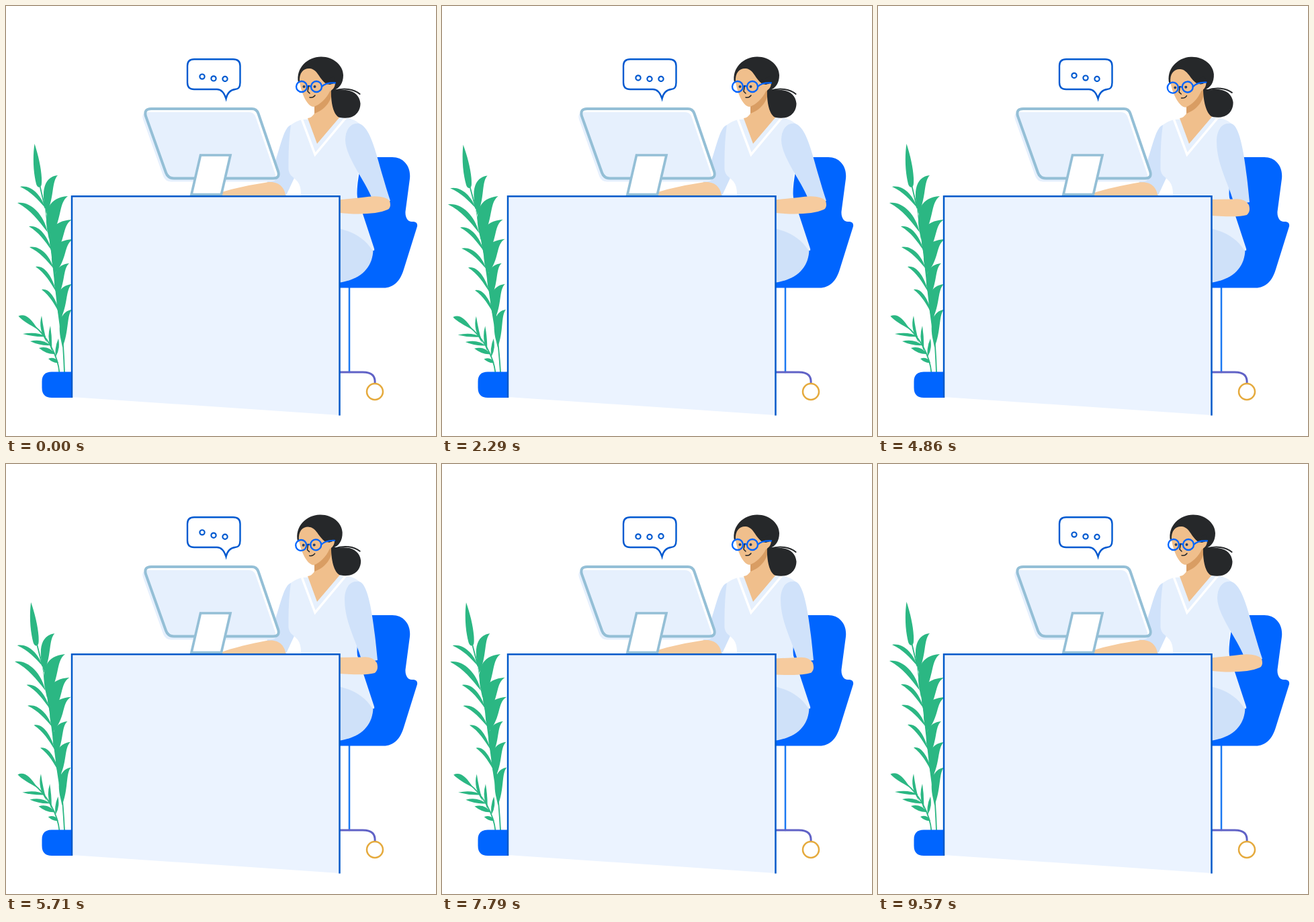
Recreate the animation shown at these times as an HTML page. Size 640 px wide and 640 px high, loop 9640 ms.

```html
<!DOCTYPE html>
<html lang="en">
<head>
<meta charset="utf-8">
<title>Desk</title>
<style>
html, body { margin: 0; width: 100%; height: 100%; overflow: hidden; background: #fff; }
svg { display: block; width: 100vw; height: 100vh; }
.line { fill: none; stroke-linecap: round; stroke-linejoin: round; }
</style>
</head>
<body>
<svg viewBox="0 0 640 640">
  <defs>
    <path id="screen" d="M216 153H366Q373 153 375.500 160L405 246Q408 256.500 398 256.500H250Q241 256.500 238 248L208 164Q205 153 216 153Z"/>
  </defs>

  <!-- plant -->
  <g id="plant" fill="#2bb783">
    <path d="M42.500 205C40 222 40 245 45 265C47 272 53 271 53 264C54 248 49 225 42.500 205Z"/>
    <path class="line" stroke="#2bb783" stroke-width="1.800" d="M50 266L58 300M80 455C84 485 86 515 87 546"/>
    <path d="M57 295L64 335L70 365L74 400L80 430L84 465L85 500L83 500L77 455L72 410L67 365L61 325Z"/>
  </g>
  <g id="sprig" fill="#2bb783">
    <path d="M18.500 461.500C28 457 37 464 47 481C36 475 24 468 18.500 461.500Z"/>
    <path class="line" stroke="#2bb783" stroke-width="1.800" d="M42 476C60 491 77 518 79.500 546"/>
  </g>
  <path d="M98 544.500H68Q53.500 544.500 53.500 559V568Q53.500 583 68 583H98Z" fill="#0065ff"/>

  <!-- chair -->
  <path d="M511 418V545" class="line" stroke="#1b78f2" stroke-width="2.500"/>
  <path d="M490 545H531C545 545 550 551 549 562" class="line" stroke="#6062c6" stroke-width="3"/>
  <circle cx="549" cy="574" r="12" fill="#fff" stroke="#e5aa3d" stroke-width="2.500"/>
  <path d="M534 225H575C592 225 603 239 601 257L594.500 306C594 315 598 321 604 321H607Q613 322 612 328L592 392C587 409 577 419.500 562 419.500H490V330L522 290C522 268 525 240 534 225Z" fill="#0065ff"/>

  <!-- body -->
  <path d="M490 329C520 333 540 348 546.500 362C546 391 526 409 490 412.500Z" fill="#cfe1f9"/>
  <path d="M424 177C414 181 410 203 400 234L388 264L416 284L429 256L434 220Z" fill="#d0e2fa"/>
  <path d="M424 177Q432 171 441 169L505 166Q518 168 526 175L524 250Q521 270 523 285L548 361Q549 366 545 363C532 344 515 335 490 330V284H439C440 262 432 260 424 252Q420 247 420.500 240Q420 205 424 177Z" fill="#e6f0fd"/>
  <path d="M440.500 169L460 221L506 166" fill="none" stroke="#fff" stroke-width="3.500"/>
  <path d="M460 146L459.500 159Q456 166 449 167L463 205L497 165L488 122Z" fill="#f0bf8c"/>
  <path d="M459 146L485 122C487 139 476 154 459 160Z" fill="#d99d63"/>
  <path id="sleeve" fill="#d0e2fa"/>
  <path id="forearm" fill="#f6cb9e"/>

  <!-- head -->
  <g id="tail">
    <path d="M484 123C483 145 488 164 497 166C519 170 527.500 157 527.500 145C526 129 511 123 494 125Z" fill="#26282a"/>
    <path d="M488 126C504 121 518 124 526.500 131" class="line" stroke="#26282a" stroke-width="2"/>
  </g>
  <g id="head">
    <path d="M435 114C431 92 449 75.500 469 75.500C488 75.500 502 89 502 103C502 115 496 123 488 125L470 118Z" fill="#26282a"/>
    <path d="M437 113C436 99 443 92.500 452 93C464 94 466 109 477 116Q484 118 490 114C490 121 486 125 482 127C477 138 467 147 458 150C449 150 440 132 437 113Z" fill="#f0bf8c"/>
    <path d="M472 111L482 117L490 113L488 105Z" fill="#26282a"/>
    <g class="line" stroke="#0065ff" stroke-width="2.300">
      <circle cx="440" cy="120" r="8"/><circle cx="462" cy="120" r="8"/>
      <path d="M448 120Q451 118 454 120M470 120C475 115 483 114 490 114.500"/>
    </g>
    <circle cx="443.500" cy="120" r="2" fill="#26406b"/><circle cx="459.500" cy="120" r="2" fill="#26406b"/>
    <path d="M450.500 119L449 127L452 130M452 136Q457 137 460 133" class="line" stroke="#26282a" stroke-width="1.500"/>
  </g>

  <!-- computer -->
  <path id="hand" d="M318 278C340 271 365 266 388 262.500C405 260 416 269 416.500 287H318Z" fill="#f6cb9e"/>
  <use href="#screen" fill="#fff"/>
  <use href="#screen" fill="#e6f0fd" transform="translate(-4 5)"/>
  <use href="#screen" fill="none" stroke="#94bfd6" stroke-width="4"/>
  <path d="M289.500 222H334L320.500 280.500H276Z" fill="#fff" stroke="#94bfd6" stroke-width="3.700"/>

  <!-- desk -->
  <path d="M98 283.300H496.500V609L98 582Z" fill="#ebf3ff"/>
  <path d="M98 583V283.300H496.500V609.500" fill="none" stroke="#0059c9" stroke-width="2.500"/>

  <!-- bubble -->
  <g fill="#fff" stroke="#0059d0" stroke-width="2.400">
    <path d="M280 79.300H338Q348.500 79.300 348.500 89V114Q348.500 124 341 124C333 125 329 131 327.500 138C325 130 321 124 314 124H280Q270 124 270 114V89Q270 79.300 280 79.300Z"/>
    <g id="dots"></g>
  </g>
</svg>
<script>
const $ = id => document.getElementById(id);
const add = (parent, tag, attrs) => {
  const el = document.createElementNS('http://www.w3.org/2000/svg', tag);
  for (const k in attrs) el.setAttribute(k, attrs[k]);
  return parent.appendChild(el);
};

// leaves: tip x, tip y, joint x, joint y
const leftLeaves = [[21, 269, 58, 300], [17, 293, 62, 337], [34, 328, 68, 364],
  [35, 359, 71, 391], [44, 388, 75, 426], [53, 422, 81, 460]];
const rightLeaves = [[77, 252, 58, 300], [92, 283, 62, 337], [98, 318, 67, 364],
  [100, 347, 70, 389], [94, 383, 74, 425], [98, 414, 78, 458], [98, 452, 82, 498]];
const sprigLeaves = [[25, 488, 60, 492], [36, 499, 66, 505], [49, 509, 73, 518], [63, 525, 78, 531],
  [53, 461, 61, 501], [66, 476, 68, 513], [78, 495, 74, 522]];

for (const [x, y, a, b] of leftLeaves) {
  const w = a - x, h = b - y;
  add($('plant'), 'path', { d: `M${x} ${y}C${x + w * 0.4} ${y - 3} ${a - 6} ${y + h * 0.35} ${a} ${b}
    C${a - w * 0.3} ${b - h * 0.4} ${x + w * 0.45} ${y + h * 0.25} ${x} ${y}Z` });
}
for (const [x, y, a, b] of rightLeaves) {
  const w = x - a, h = b - y;
  add($('plant'), 'path', { d: `M${a} ${b}C${a - 6} ${b - h * 0.6} ${a + w * 0.05} ${y + 2} ${x} ${y}
    C${x - w * 0.5} ${y + h * 0.2} ${a + w * 0.75} ${b - h * 0.3} ${a + 2} ${b + 10}Z` });
}
sprigLeaves.forEach(([x, y, a, b], i) => {
  const d = i < 4
    ? `M${x} ${y}Q${(x + a) / 2 + 3} ${y - 4} ${a} ${b}Q${(x + a) / 2} ${b + 1} ${x} ${y}Z`
    : `M${x} ${y}Q${x - 6} ${(y + b) / 2} ${a} ${b}Q${x + 3} ${(y + b) / 2 + 2} ${x} ${y}Z`;
  add($('sprig'), 'path', { d });
});

const dots = [292, 309, 326].map(cx => add($('dots'), 'circle', { cx, r: 3.6, 'stroke-width': 2.2 }));

// arm poses: elbow out, elbow in
const sleeve = [
  'M526 175C546 183 552 230 572 290L548 296C540 266 506 228 505 200C505 184 513 173 526 175Z',
  'M526 175C540 179 547 230 553 292L530 296C525 270 504 238 504 202C504 184 512 173 526 175Z'];
const forearm = [
  'M480 290L530 285Q562 280 571 290Q574 300 568 303C550 311 515 311 480 306Z',
  'M480 288L530 287.500Q546 286 552 296Q555 306 549 311C535 315 515 313 480 311Z'];
const blend = ([a, b], k) => {
  const to = b.match(/[\d.]+/g);
  let i = 0;
  return a.replace(/[\d.]+/g, n => (+n + (to[i++] - n) * k).toFixed(2));
};

const LOOP = 9640, SPAN = 9570, STEP = 1000 / 14;
const clamp = u => Math.min(1, Math.max(0, u));
const ease = (t, from, to) => (1 - Math.cos(Math.PI * clamp((t - from) / (to - from)))) / 2;
const tap = (t, from, count) =>
  t > from && t < from + 480 * count ? Math.sin(Math.PI * (t - from) / 480) ** 2 : 0;
const turn = (id, deg, x, y) => $(id).setAttribute('transform', `rotate(${deg.toFixed(3)} ${x} ${y})`);

// slow accelerating rise, quick drop, rest
function hop(p) {
  if (p < 490) return 7.5 * (p / 490) ** 2;
  return 7.5 * (1 - ease(p, 490, 580));
}

function draw(t) {
  const s = t % (SPAN / 2);
  const sway = -1.95 * (ease(s, 0, 1950) - ease(s, 1950, 4250));
  turn('plant', sway, 86, 544);
  turn('sprig', sway * 0.8, 79, 544);

  const beat = SPAN / 12;
  dots.forEach((dot, i) => dot.setAttribute('cy', 108.5 - hop((t + 330 - 190 * i + beat) % beat)));

  const look = ease(t, 2290, 3290) - ease(t, 5290, 6290);
  turn('head', -2.8 * look, 472, 146);
  turn('tail', -3 * look, 486, 124);

  const arm = ease(t, 2290, 3290) - ease(t, 8570, SPAN);
  $('sleeve').setAttribute('d', blend(sleeve, arm));
  $('forearm').setAttribute('d', blend(forearm, arm));
  turn('forearm', 2 * tap(t, 0, 4) - 3 * tap(t, 6200, 5), 562 - 18 * arm, 294 + 6 * arm);
  turn('hand', -2 * tap(t, 4000, 4), 405, 275);
}

const start = performance.now();
function tick(now) {
  const t = Math.max(0, now - start) % LOOP;
  draw(Math.min(SPAN, Math.floor((t + 5) / STEP) * STEP));
  requestAnimationFrame(tick);
}
draw(0);
requestAnimationFrame(tick);
</script>
</body>
</html>
```
